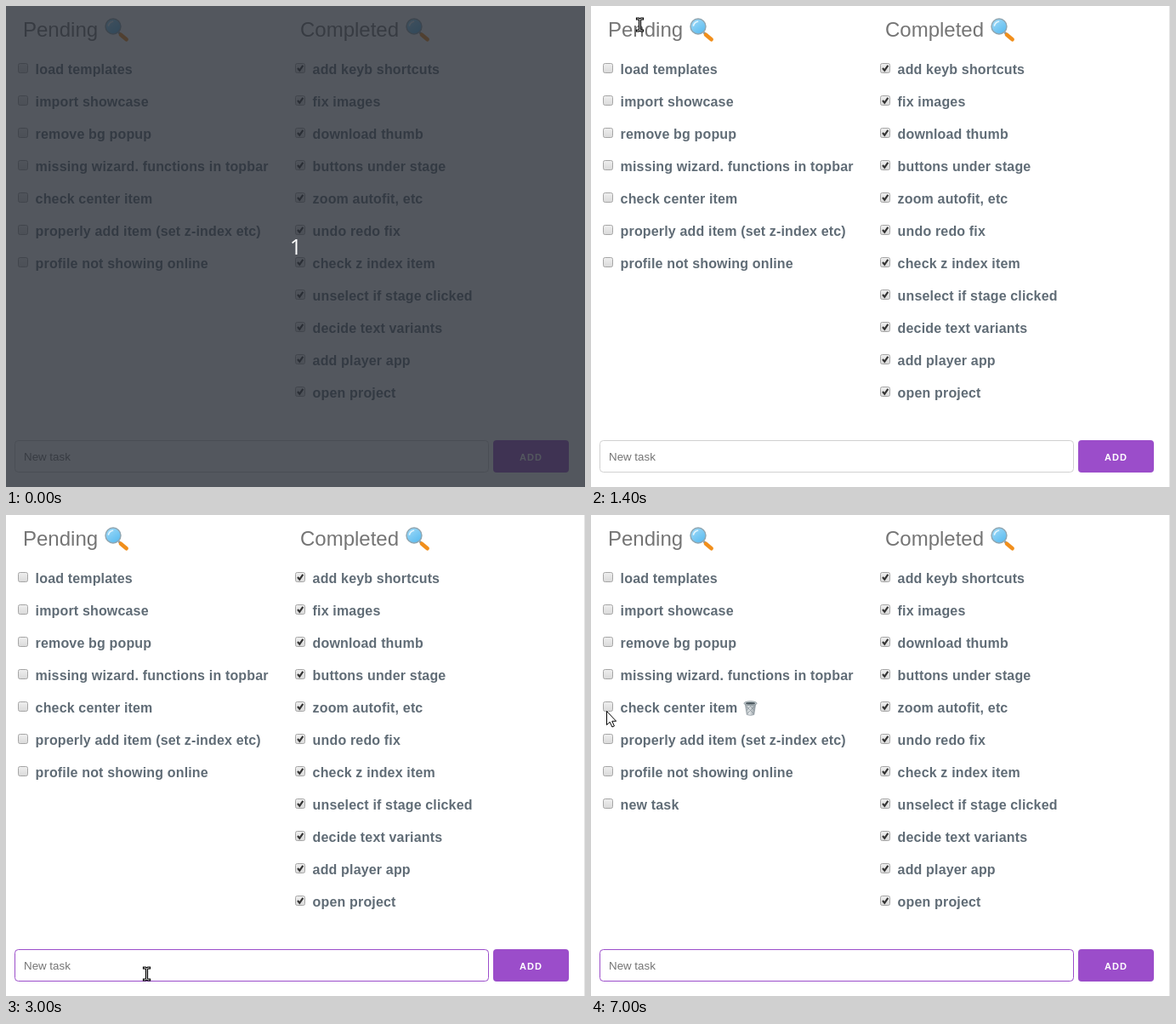
An HTML page for the animation above (8 s loop, 681 px wide and 565 px high).

```html
<!DOCTYPE html>
<html lang="en">
<head>
<meta charset="utf-8">
<title>Task list</title>
<style>
  html, body { margin: 0; width: 100%; height: 100%; overflow: hidden; background: #fff; }
  svg { display: block; width: 681px; height: 565px; }
  text { font-family: "Liberation Sans", Arial, sans-serif; white-space: pre; }
  .title { font-size: 24px; fill: #757575; }
  .item { font-size: 16px; font-weight: bold; letter-spacing: .16px; fill: #606c76; }
  .field { font-size: 13.333px; }
  .add { font-size: 11px; font-weight: bold; letter-spacing: 1px; fill: #fff; }
  .count { font: 25px "Open Sans", sans-serif; fill: #fff; text-anchor: middle; }
</style>
</head>
<body>
<svg viewBox="0 0 681 565">
  <defs>
    <linearGradient id="face" x2="0" y2="1">
      <stop stop-color="#efefef"/><stop offset="1" stop-color="#dadada"/>
    </linearGradient>
    <linearGradient id="lensFill" x2=".7" y2="1">
      <stop stop-color="#a5dcf8"/><stop offset="1" stop-color="#5cbcf0"/>
    </linearGradient>
    <linearGradient id="binFill" x2="1" y2="0">
      <stop stop-color="#98a1a6"/><stop offset=".4" stop-color="#e2e6e8"/><stop offset="1" stop-color="#8b959b"/>
    </linearGradient>
    <filter id="soft" x="-50%" y="-50%" width="200%" height="200%"><feGaussianBlur stdDeviation="9"/></filter>
    <rect id="box" x=".5" y=".5" width="11" height="11" rx="2" fill="url(#face)" stroke="#a6a6a6"/>
    <path id="tick" d="M3 6l2.3 2.7L9.3 2.8" fill="none" stroke="#333" stroke-width="2.1"/>
    <g id="lens">
      <path d="M16.5 17L19 19.5" stroke="#8a99a2" stroke-width="2.6"/>
      <path d="M19 19.7L25.6 25.2" stroke="#f18f1c" stroke-width="4.6" stroke-linecap="round"/>
      <circle cx="10" cy="10" r="9" fill="url(#lensFill)" stroke="#8fa5b0" stroke-width="1.4"/>
      <path d="M4.5 9Q5.5 5 9.5 4.2" fill="none" stroke="#e4f6ff" stroke-width="1.6" stroke-linecap="round"/>
    </g>
    <g id="bin">
      <path d="M2.3 4L4.2 16.5Q8.5 18.3 12.8 16.5L14.7 4Z" fill="url(#binFill)" stroke="#87929a" stroke-width=".6"/>
      <path d="M4 7l8.5 8.5M8 6l5 5.5M13 7l-8.5 8.5M9 6l-5 5.5" stroke="#838e95" stroke-width=".7"/>
      <ellipse cx="8.5" cy="3.2" rx="7.6" ry="2.4" fill="#c6ced2" stroke="#7c888f" stroke-width=".7"/>
      <ellipse cx="8.5" cy="3.3" rx="5.6" ry="1.3" fill="#49555c"/>
    </g>
    <path id="beamShape" d="M-3 -7H-1.5L0 -6L1.5 -7H3M0 -6V6M-3 7H-1.5L0 6L1.5 7H3"/>
  </defs>

  <rect width="681" height="565" fill="#fff"/>
  <path d="M680.5 0V565" stroke="#e3e3e3"/>
  <text class="title" x="20" y="36">Pending</text>
  <text class="title" x="346" y="36">Completed</text>
  <use href="#lens" x="116" y="14"/>
  <use href="#lens" x="470" y="14"/>
  <g id="lists"></g>
  <use id="trash" href="#bin"/>

  <rect id="input" x="10.5" y="510.5" width="557" height="37" rx="4" fill="#fff"/>
  <text id="hint" class="field" x="21" y="534" fill="#757575">New task</text>
  <text id="typed" class="field" x="21" y="534" fill="#222"></text>
  <rect x="573" y="510" width="89" height="38" rx="4" fill="#9b4dca"/>
  <text class="add" x="604" y="534">ADD</text>
  <rect id="searchCaret" x="20" y="15" width="1" height="27"/>
  <rect id="taskCaret" y="522" width="1" height="15"/>

  <g id="cursor">
    <path id="arrow" d="M.5 .5V16.6L4.2 13.2L6.9 19L9.4 17.9L6.8 12.2H11.6Z" fill="#fff" stroke="#000"/>
    <g id="beam" fill="none" stroke-linecap="square">
      <use href="#beamShape" stroke="#000" stroke-width="3.2"/>
      <use href="#beamShape" stroke="#fff" stroke-width=".8"/>
    </g>
  </g>

  <g id="sky">
    <rect width="681" height="85" fill="#005b89"/>
    <g fill="#2e6396" opacity=".75" filter="url(#soft)">
      <ellipse cx="350" cy="7" rx="62" ry="11"/>
      <ellipse cx="285" cy="27" rx="34" ry="9" transform="rotate(-25 285 27)"/>
    </g>
    <path d="M650 85Q662 74 681 72V85Z" fill="#3f6323"/>
  </g>

  <g id="countdown">
    <rect width="681" height="565" fill="rgb(41,46,54)" opacity=".8"/>
    <text class="count" x="341" y="292">1</text>
  </g>
</svg>

<script>
const LOOP = 8000, STEP = 100, PITCH = 38;
const FOCUS = 2600, TYPE = 3200, SUBMIT = 4000;
const $ = id => document.getElementById(id);
const pending = ["load templates", "import showcase", "remove bg popup",
  "missing wizard. functions in topbar", "check center item",
  "properly add item (set z-index etc)", "profile not showing online", "new task"];
const completed = ["add keyb shortcuts", "fix images", "download thumb", "buttons under stage",
  "zoom autofit, etc", "undo redo fix", "check z index item", "unselect if stage clicked",
  "decide text variants", "add player app", "open project"];

function addRow(x, label, i, done) {
  const g = document.createElementNS("http://www.w3.org/2000/svg", "g");
  g.setAttribute("transform", `translate(${x} ${67 + i * PITCH})`);
  g.innerHTML = `<use href="#box"/>${done ? '<use href="#tick"/>' : ""}<text class="item" x="20.6" y="13">${label}</text>`;
  $("lists").append(g);
  return g;
}
const rows = pending.map((label, i) => addRow(14, label, i, false));
completed.forEach((label, i) => addRow(340, label, i, true));

// Pointer stops: time, x, y
const stops = [[500, 560, 90], [1100, 90, 62], [1200, 57, 22], [1600, 57, 22],
  [1800, 171, 406], [2000, 177, 525], [2400, 165, 539], [4800, 165, 539],
  [5600, 80, 286], [5700, 58, 233], [6200, 15, 227], [6600, 18, 230]];

const within = (t, a, b) => t >= a && t < b;
const show = (el, on) => { el.style.display = on ? "" : "none"; };

function pointer(t) {
  const i = stops.findIndex(s => s[0] > t);
  if (i < 1) return stops.at(i).slice(1);
  const a = stops[i - 1], b = stops[i], k = (t - a[0]) / (b[0] - a[0]);
  return [1, 2].map(n => Math.round(a[n] + (b[n] - a[n]) * k));
}

// The hover icon trails the pointer by one step
function hoveredRow(t) {
  const [x, y] = pointer(t - STEP);
  const row = Math.floor((y - 55) / PITCH);
  return x < 330 && row < (t < SUBMIT ? 7 : 8) ? row : -1;
}

// Keys arrive two per step
const burst = (word, t, start) => word.slice(0, Math.max(0, (t - start) / STEP + 1) * 2);
const typedText = t => t < SUBMIT ? burst("new ", t, TYPE) + burst("tas", t, TYPE + 400) : "";

function caretOn(t) {
  if (t < TYPE) return within(t, FOCUS, 3000);
  return t < 4360 || (t - 4360) % 1020 < 510;
}

function drawPointer(t, visible) {
  show($("cursor"), visible);
  const [x, y] = pointer(t);
  const overField = y < 45 || y > 510;
  $("cursor").setAttribute("transform", `translate(${x + (overField ? .5 : 0)} ${y})`);
  show($("beam"), overField);
  show($("arrow"), !overField);
}

function drawTrash(row) {
  show($("trash"), row >= 0);
  if (row < 0) return;
  const end = 34 + rows[row].querySelector("text").getComputedTextLength();
  $("trash").setAttribute("transform", `translate(${Math.round(end + 7)} ${66 + row * PITCH})`);
}

function drawInput(t) {
  const text = typedText(t);
  $("typed").textContent = text;
  show($("hint"), !text);
  $("input").setAttribute("stroke", t >= FOCUS ? "#9b4dca" : "#d1d1d1");
  show($("taskCaret"), caretOn(t));
  $("taskCaret").setAttribute("x", 21 + (text ? Math.round($("typed").getComputedTextLength()) : 0));
}

function render(t) {
  const sky = within(t, 400, 500) || within(t, 1500, 1700);
  show($("countdown"), t < 400);
  show($("sky"), sky);
  show(rows[7], t >= SUBMIT);
  show($("searchCaret"), within(t, 1700, 2300));
  drawPointer(t, t >= 500 && !sky);
  drawTrash(t < 500 ? -1 : hoveredRow(t));
  drawInput(t);
}

const start = performance.now();
function tick() {
  const t = (performance.now() - start) % LOOP;
  render(Math.floor(t / STEP) * STEP);
  requestAnimationFrame(tick);
}
tick();
</script>
</body>
</html>
```
